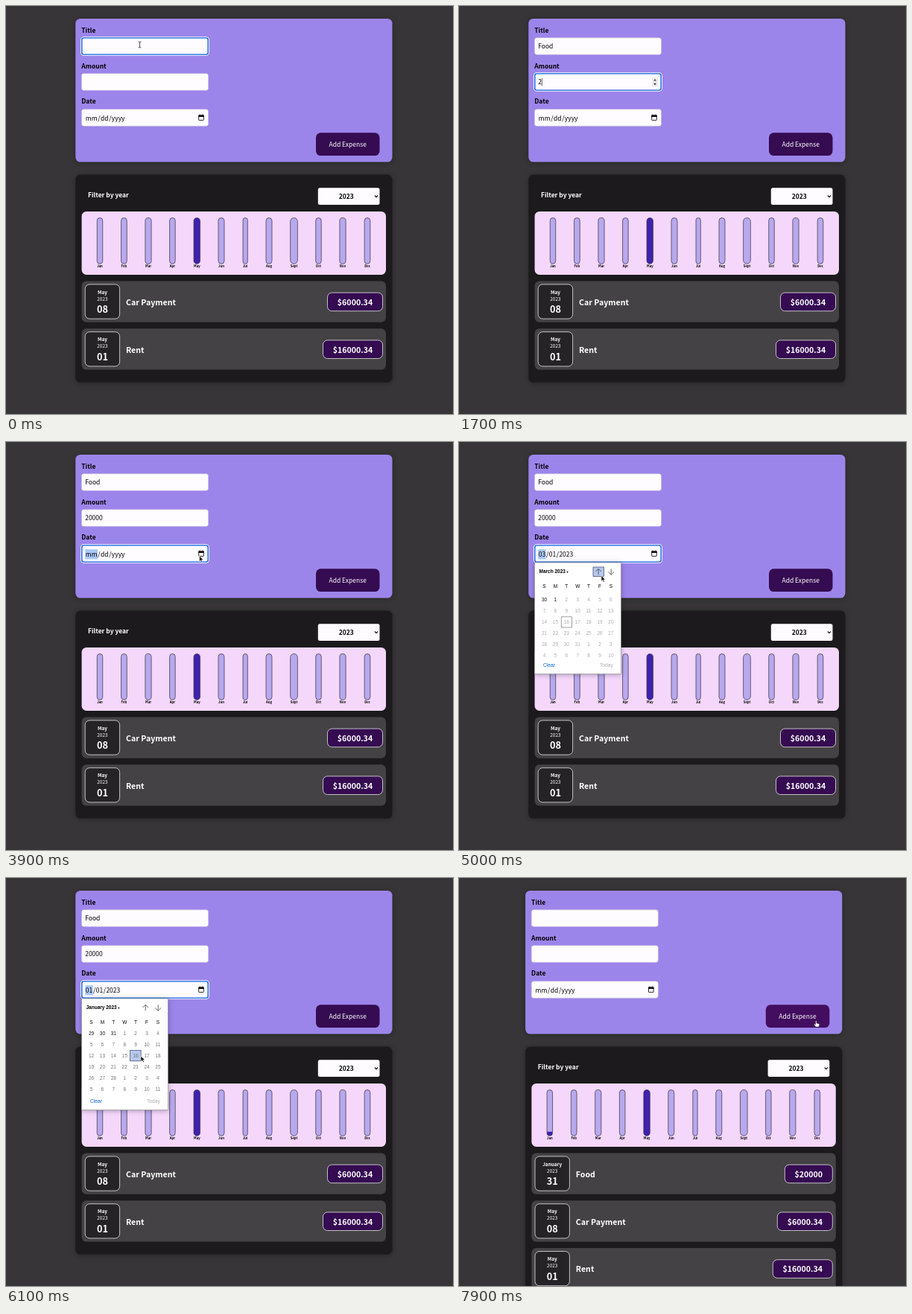
Write an HTML page that moves like this. It is 600 px wide and 548 px high and loops after 8 s.

```html
<!DOCTYPE html>
<html lang="en">
<head>
<meta charset="utf-8">
<title>Expense tracker</title>
<style>
  html, body { margin: 0; width: 100%; height: 100%; overflow: hidden; background: #373537; }
  svg { display: block; width: 600px; height: 548px; font: 8.5px "Noto Sans CJK JP", "Noto Sans CJK", "Noto Sans JP", sans-serif; }
  .panel { filter: drop-shadow(0 1px 3px rgba(0, 0, 0, .3)); }
  .picker { font: 6.5px "Liberation Sans", Arial, sans-serif; }
</style>
</head>
<body>
<svg id="stage" viewBox="0 0 600 548"></svg>
<script>
const LOOP = 8000, STEP = 100;
const ADDED = 7900, OPEN = 4000, CLOSE = 6600;
const WHITE = '#fefcff', DARK = '#350b51', BLUE = '#0b62e0';
const MONTHS = ['January', 'February', 'March', 'April', 'May', 'June', 'July',
  'August', 'September', 'October', 'November', 'December'];
// Bar centre and width for each month
const BARS = [['Jan', 126, 7.5], ['Feb', 158.4, 7.7], ['Mar', 191, 8.2], ['Apr', 223.4, 7.6],
  ['May', 256.3, 8.5], ['Jun', 289, 8], ['Jul', 321.2, 6.3], ['Aug', 353, 8],
  ['Sept', 386.5, 9.7], ['Oct', 419.5, 7.5], ['Nov', 452, 8.2], ['Dec', 485, 7.7]];
const EXPENSES = [['May', '08', 'Car Payment', '$6000.34', 74], ['May', '01', 'Rent', '$16000.34', 80]];
const NEW_EXPENSE = ['January', '31', 'Food', '$20000', 64];
const TITLE_KEYS = [200, 400, 600, 800], AMOUNT_KEYS = [1600, 1900, 2000, 2100, 2200];
const POINTER = [[0, 179.5, 52], [3100, 179.5, 52], [3700, 259.5, 153], [4200, 259.5, 153],
  [4700, 191, 179.5], [5750, 191, 179.5], [6100, 181, 239], [6500, 290, 190],
  [6900, 380, 205], [7400, 481.5, 213.5], [7800, 479.5, 191.5], [8000, 479.5, 191.5]];
// Month clicks: time, first week row of the month shown (rows counted from 29 January)
const CLICKS = [[0, 13, 4], [4963, 8, 3], [5350, 4, 2], [5700, 0, 1]];

const rect = (x, y, w, h, r, fill, extra = '') =>
  `<rect x="${x}" y="${y}" width="${w}" height="${h}" rx="${r}" fill="${fill}" ${extra}/>`;
const text = (x, y, s, { size = 8.5, bold, fill = '#000', anchor = 'start' } = {}) =>
  `<text x="${x}" y="${y}" font-size="${size}" font-weight="${bold ? 700 : 400}" fill="${fill}" text-anchor="${anchor}">${s}</text>`;
const path = (d, fill, extra = '') => `<path d="${d}" fill="${fill}" ${extra}/>`;
const line = (d, color, width) => path(d, 'none', `stroke="${color}" stroke-width="${width}"`);
const smooth = p => { p = Math.min(1, Math.max(0, p)); return p * p * (3 - 2 * p); };
const typed = (word, keys, t) => word.slice(0, keys.filter(k => t >= k).length);

function pointerAt(t) {
  const i = Math.max(1, POINTER.findIndex(p => p[0] > t));
  const [t0, x0, y0] = POINTER[i - 1], [t1, x1, y1] = POINTER[i];
  const p = smooth((t - t0) / (t1 - t0));
  return [x0 + (x1 - x0) * p, y0 + (y1 - y0) * p];
}

function calendarAt(t) {
  const i = CLICKS.filter(c => t >= c[0]).length - 1;
  const [start, row, month] = CLICKS[i];
  const from = i ? CLICKS[i - 1][1] : row;
  const p = i ? smooth((t - start) / 300) : 1;
  return { month, row: from + (row - from) * p, scrolling: p < 1, chosen: i > 0 };
}

function input(y, focused) {
  return focused
    ? rect(101.3, y - .3, 170.4, 23.2, 3, WHITE, 'stroke="#fff" stroke-width="2.4"') +
      rect(101.8, y + .2, 169.4, 22.2, 2.6, WHITE, `stroke="${BLUE}" stroke-width="1.4"`)
    : rect(101.5, y, 170, 22.6, 3, WHITE, 'stroke="#c9c1dc" stroke-width=".5"');
}

function caret(s, y, t, keys) {
  const last = keys.filter(k => t >= k).pop();
  if (last === undefined || (t - last) % 1000 >= 500) return '';
  const x = 106.6 + s.length * 4.72;
  return line(`M${x} ${y - 5}v10`, '#000', .6);
}

function form(t, hover) {
  const added = t >= ADDED;
  const focus = t < 1200 ? 'title' : t < 3800 ? 'amount' : t < 6900 ? 'date' : '';
  const title = added ? '' : typed('Food', TITLE_KEYS, t);
  const amount = added ? '' : typed('20000', AMOUNT_KEYS, t);
  const cal = calendarAt(t);
  const filled = cal.chosen && !added;
  const parts = filled ? [`0${cal.month}`, '/', '01', '/', '2023'] : ['mm', '/', 'dd', '/', 'yyyy'];
  const xs = filled ? [106.8, 117, 120.8, 130.7, 134.4] : [106.8, 123.2, 127, 138.2, 141.8];

  let s = rect(93.3, 17, 425.2, 192.5, 6.4, '#9c85ea', 'class="panel"');
  ['Title', 'Amount', 'Date'].forEach((label, i) =>
    s += text(101.3, 35.6 + i * 47.9, label, { bold: true }) +
      input(42.7 + i * 48, focus === label.toLowerCase()));
  s += text(106.2, 57.4, title) + text(106.2, 105.4, amount);
  if (focus === 'title') s += caret(title, 54, t, [...TITLE_KEYS]);
  if (focus === 'amount') {
    s += caret(amount, 102, t, [1200, ...AMOUNT_KEYS]) + rect(259, 96.3, 8, 11.6, .5, '#ececec') +
      path('M261 100.6l2-2.6 2 2.6zM261 103.8l2 2.6 2-2.6z', '#444');
  }
  if (focus === 'date') s += rect(106.3, 144.2, filled ? 10.3 : 16.7, 13.2, 0, '#a9c8fa');
  parts.forEach((p, i) => s += text(xs[i], 153.6, p));
  s += rect(258.7, 147, 6.6, 6.4, .5, 'none', 'stroke="#111" stroke-width=".9"') +
    path('M258.3 146.5h7.4v2.4h-7.4zM259.5 145.6h1v1h-1zM263.5 145.6h1v1h-1z', '#111');
  return s + rect(416, 170.3, 85.5, 30.8, 6.4, hover ? '#430d60' : DARK) +
    text(458.7, 189.3, 'Add Expense', { anchor: 'middle', fill: '#fff' });
}

function expense([month, day, name, price, width], i) {
  const y = 369.5 + i * 63.8;
  const mid = (x, dy, s, size, bold = true) => text(x, y + dy, s, { size, bold, fill: '#fff', anchor: 'middle' });
  const border = 'stroke="#fff" stroke-width=".7"';
  return rect(101.6, y, 408.4, 55.2, 6.4, '#444244') +
    rect(106.2, y + 4.4, 46.4, 46.2, 6, '#252326', border) +
    mid(129.4, 17, month, 6.4) + mid(129.4, 26, '2023', 6.4, false) + mid(129.4, 42.6, day, 12.75) +
    text(161, y + 32.2, name, { size: 10.63, bold: true, fill: '#fff' }) +
    rect(505.5 - width, y + 15.6, width, 24.6, 6, DARK, border) +
    mid(505.5 - width / 2, 32.2, price, 10.63);
}

function report(t) {
  const added = t >= ADDED;
  const list = added ? [NEW_EXPENSE, ...EXPENSES] : EXPENSES;
  let s = rect(93.3, 226.6, 425.2, added ? 342.8 : 279, 6.4, '#1c1a1d', 'class="panel"') +
    text(110, 257, 'Filter by year', { bold: true, fill: '#fff' }) +
    rect(418.8, 244.2, 82.7, 22.8, 2.5, WHITE) +
    text(456.7, 258.9, '2023', { bold: true, anchor: 'middle' }) +
    line('M494.9 254.5l2.1 2.2 2.1-2.2', '#111', 1.1) +
    rect(101.6, 275.9, 408.4, 85, 6.4, '#f4d7fb');
  BARS.forEach(([label, x, w], i) => {
    const share = i === 4 ? 1 : i === 0 && added ? .91 * (t - 7870) / 300 : 0;
    const bar = (fill, extra) => rect(x - w / 2, 284.5, w, 61.8, w / 2, fill, extra);
    s += bar('#b8a8ee');
    if (share) s += bar('#3f21ae', `style="clip-path:inset(${100 - share * 100}% 0 0)"`);
    s += bar('none', 'stroke="#353038" stroke-width=".7"') +
      text(x, 351.2, label, { size: 4.25, bold: true, anchor: 'middle' });
  });
  return s + list.map(expense).join('');
}

function picker(t, px, py) {
  const { month, row, scrolling, chosen } = calendarAt(t);
  const cell = 14.9, left = 107.05, top = 201.6;
  const heading = `${MONTHS[month - 1]} 2023`;
  const overUp = px > 180 && px < 195 && py > 167 && py < 182;
  const small = { size: 6.5, anchor: 'middle' };
  const hoverStyle = 'stroke="#33415f" stroke-width=".7"';
  const arrow = (x, dir) => line(`M${x} ${174.3 + 4 * dir}v${-8 * dir}m-3.8 ${3.8 * dir}l3.8 ${-3.8 * dir} 3.8 ${3.8 * dir}`, '#444', .8);

  let s = rect(101.5, 162, 116, 149.5, 0, '#fff', 'class="panel" stroke="#8d8a92" stroke-width=".6"') +
    `<text x="107.5" y="176.2" font-weight="700">${heading}<tspan dx="1.5" dy="-.4" font-size="4.2">▾</tspan></text>`;
  if (overUp) s += rect(180, 168, 14.4, 12.6, 0, '#b7c8ee', hoverStyle);
  s += arrow(187.2, 1) + arrow(204.2, -1);
  [...'SMTWTFS'].forEach((d, c) => s += text(left + (c + .5) * cell, 196, d, small));

  s += '<g clip-path="url(#days)">';
  const first = Math.floor(row);
  for (let i = 0; i < 49; i++) {
    const week = first + Math.floor(i / 7), col = i % 7;
    const date = new Date(Date.UTC(2023, 0, 29 + week * 7 + col));
    const m = date.getUTCMonth() + 1, d = date.getUTCDate();
    const x = left + col * cell, y = top + (week - row) * cell;
    const selected = chosen && m === month && d === 1;
    const hover = px >= x && px < x + cell && py >= y && py < y + cell && py > top;
    const disabled = m > 5 || (m === 5 && d > 1);
    if (selected) s += rect(x, y, 14.5, 14.5, 0, '#0b66ec');
    else if (hover && !disabled) s += rect(x, y + .2, 14.5, 14.2, 0, '#b7c8ee', hoverStyle);
    else if (m === 5 && d === 16) s += rect(x + .4, y + .3, 14.2, 14.2, 0, 'none', 'stroke="#777" stroke-width=".7"');
    const fill = selected ? '#fff' : disabled ? '#adadad' : m === month || scrolling ? '#111' : '#777';
    s += text(x + cell / 2, y + 9.7, d, { ...small, fill, bold: selected });
  }
  return `<g class="picker">${s}</g>` +
    text(113, 302.2, 'Clear', { size: 6.7, fill: BLUE }) +
    text(189, 302.2, 'Today', { size: 6.7, fill: '#adadad' }) + '</g>';
}

function pointer(x, y, kind) {
  const shapes = {
    beam: line('M-1.8 -4q1.8 0 1.8 1.2v5.6q0 1.2 -1.8 1.2M1.8 -4q-1.8 0 -1.8 1.2M0 2.8q0 1.2 1.8 1.2', '#222', .8),
    arrow: path('M0 0v7.6l1.8-1.7 1.3 2.9 1.3-.6-1.3-2.8h2.4z', '#111', 'stroke="#fff" stroke-width=".6"'),
    hand: path('M-1 .8q.8-1.3 1.5 0v2.6l3 .8q1 .4.8 1.5l-.7 2.8h-4.2l-2.4-3q-.2-1.2 1-.9l1 .8z', '#fff', 'stroke="#111" stroke-width=".5"')
  };
  return `<g transform="translate(${x} ${y})">${shapes[kind]}</g>`;
}

function scene(t) {
  const [x, y] = pointerAt(t);
  const open = t >= OPEN && t < CLOSE;
  const onButton = x > 412 && x < 501 && y > 170 && y < 201;
  const onField = x > 101 && x < 250 && [43, 91, 139].some(top => y > top && y < top + 23);
  const typing = t >= 200 && t < 3100;
  const kind = onButton ? 'hand' : onField && !open ? 'beam' : 'arrow';
  return '<clipPath id="days"><rect x="102" y="201.4" width="115" height="90"/></clipPath>' +
    rect(0, 0, 600, 548, 0, '#373537') +
    `<g transform="translate(${t >= ADDED ? -4.2 : 0} 0)">${form(t, onButton)}${report(t)}</g>` +
    (open ? picker(t, x, y) : '') + (typing ? '' : pointer(x, y, kind));
}

const stage = document.getElementById('stage');
let shown = -1;
function frame() {
  const t = Math.floor(performance.now() % LOOP / STEP) * STEP;
  if (t !== shown) stage.innerHTML = scene(shown = t);
  requestAnimationFrame(frame);
}
frame();
</script>
</body>
</html>
```
